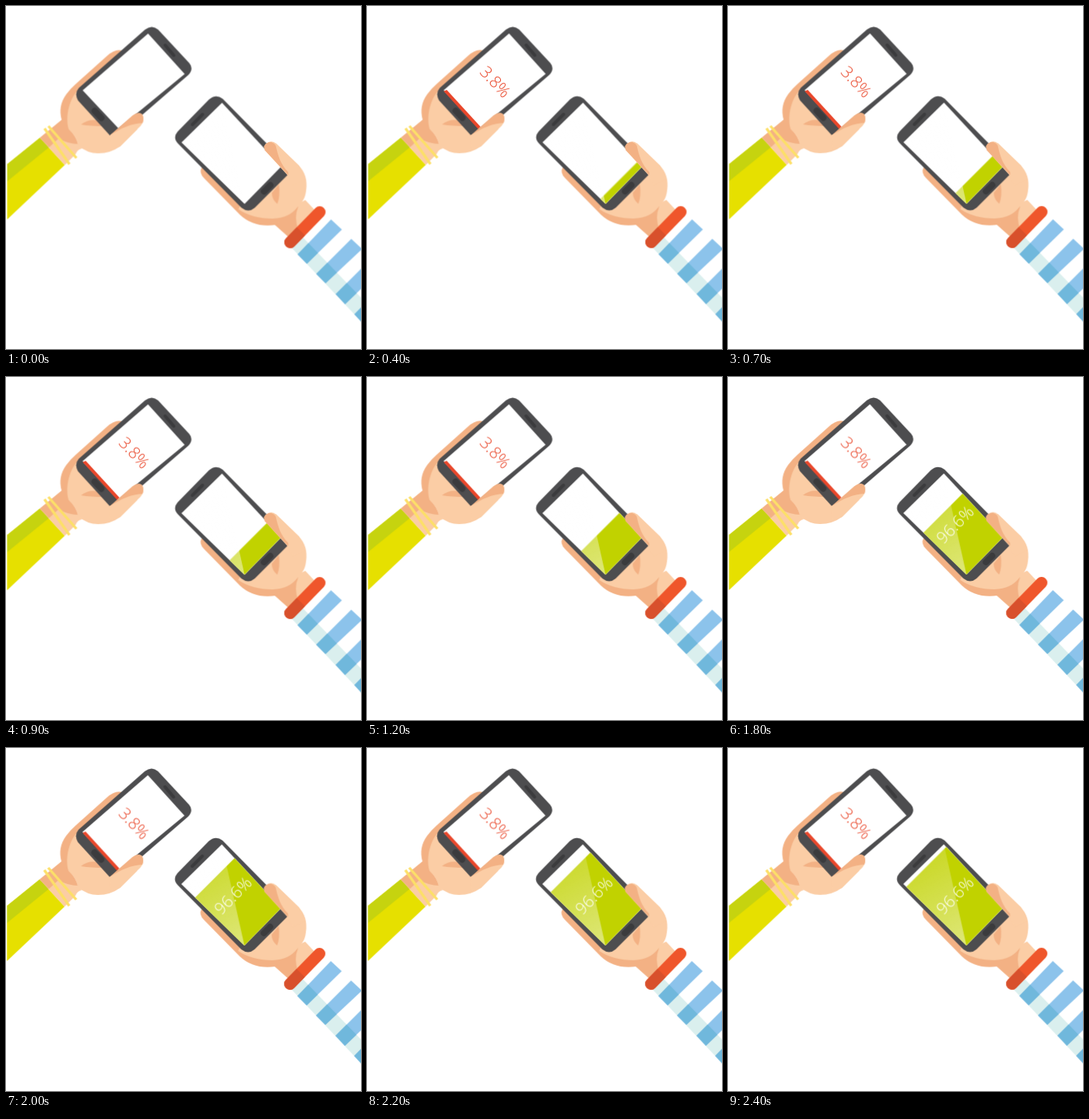
Recreate the animation shown at these times as an HTML page. Size 456 px wide and 441 px high, loop 2500 ms.

```html
<!DOCTYPE html>
<html lang="en">
<head>
<meta charset="utf-8">
<title>Charging phones</title>
<style>
  html, body { margin: 0; width: 100%; height: 100%; overflow: hidden; background: #fff; }
  svg { display: block; width: 456px; height: 441px; }
  text { font: 300 21px "Open Sans", "Noto Sans", sans-serif; text-anchor: middle; }

  .skin { fill: #fbcda5; }
  .shade { fill: #f3b184; }
  .body { fill: #4d4d4f; }
  .screen { fill: #fff; }
  .detail { stroke: #3b3b3d; stroke-linecap: round; }
  .band { stroke: #fde068; stroke-width: 3.4; }
  .low { fill: #e9472b; }

  .scene, .level, .low { animation: 2500ms linear -4ms infinite; }
  .scene { animation-name: drift; }
  .level { animation-name: charge; }
  .low { animation-name: appear; animation-timing-function: step-end; }

  @keyframes drift {
    0% { transform: translate(.5px, .4px); animation-timing-function: steps(24); }
    96%, 100% { transform: translate(.2px, -.2px); }
  }
  @keyframes appear {
    0% { opacity: 0; }
    4%, 100% { opacity: 1; }
  }
  @keyframes charge {
    0% { transform: translate(3px, 3px); animation-timing-function: steps(4); }
    16% { transform: translate(-6.5px, -6.5px); animation-timing-function: steps(5); }
    36% { transform: translate(-19px, -18.8px); animation-timing-function: steps(3); }
    48% { transform: translate(-31px, -30.5px); animation-timing-function: steps(8); }
    80% { transform: translate(-63px, -62px); animation-timing-function: steps(4); }
    96%, 100% { transform: translate(-77px, -75.5px); }
  }
</style>
</head>
<body>
<svg viewBox="0 0 456 441">
  <defs>
    <clipPath id="display"><path d="M225 175L277 124L353 206L306 254Z"/></clipPath>
    <clipPath id="sleeveShade"><path d="M360 304L376 292L456 375V406L447 396Z"/></clipPath>
    <clipPath id="cuffShade"><path d="M350 270H359L400 311V320H350Z"/></clipPath>
    <linearGradient id="gloss" gradientUnits="userSpaceOnUse" x1="300" y1="250" x2="246" y2="148">
      <stop offset="0" stop-color="#fff" stop-opacity=".46"/>
      <stop offset="1" stop-color="#fff" stop-opacity=".16"/>
    </linearGradient>
    <path id="stripes" d="M417 274L431 287L386 331L374 319Z M443 299L457 312L410 356L398 344Z
      M468 325L482 338L435 383L423 370Z M492 350L506 363L459 409L447 396Z"/>
  </defs>

  <g class="scene">
    <!-- left arm -->
    <path fill="#e6e000" d="M1 203L43 169L75 204L1 274Z"/>
    <path fill="#c6d30f" d="M1 203L43 169L55 181L1 225Z"/>
    <path class="skin" d="M43 169L71 146L92 176L97 183Q91 184 89 190L75 204Z"/>
    <path class="shade" d="M43 169L71 146Q66 128 77 113Q82 106 90 99L129 64Q140 54 149 57L150 70L96 130L80 157Q90 167 92 177Q80 177 67 170L55 181Z"/>
    <path class="skin" d="M80 158C75 140 82 117 92 108L110 110L166 150L168 158L146 180Q134 189 118 189Q104 189 92 179Q91 168 80 158Z"/>
    <path class="shade" d="M96 152Q106 144 118 147L126 154Q109 154 96 152Z"/>
    <path class="band" d="M49 157L81 203M54 154L90 195"/>

    <!-- left phone -->
    <path class="body" d="M93 105L178 30Q187 23 195 30L235 73Q241 80 234 88L174 140L133 166L92 121Q87 112 93 105Z"/>
    <path class="screen" d="M98 108L182 35L229 87L144 157Z"/>
    <path class="detail" stroke-width="8" d="M113.5 134.5L122 143.5"/>
    <path class="detail" stroke-width="4" d="M204 50L215 63"/>
    <g class="low">
      <path d="M98 109L102 107.5L145.5 155L142.5 158Z"/>
      <text transform="translate(164.5 97) rotate(47)" y="7.5">3.8%</text>
    </g>
    <path class="skin" d="M133 166L162 140.5Q169 135 174 138.500Q177.500 143 175 150Q173 154 168 158L146 180L134 184Z"/>
    <path class="shade" d="M133 166L162 140.5Q169 135 174 138.500Q177.500 143 175 150C160 151 148 156 133 166Z"/>

    <!-- right arm -->
    <path fill="#daefee" d="M367 311L376 292L456 375V406L447 396Z"/>
    <use href="#stripes" fill="#8cc3eb"/>
    <use href="#stripes" fill="#70b8dc" clip-path="url(#sleeveShade)"/>
    <path class="skin" d="M345 281L374 254L384 249L398 264L364 298Z"/>
    <path class="shade" d="M345 281L375 257Q369 272 375 287L364 298Z"/>
    <path class="shade" d="M251 207Q247 214 254 221L300 268Q318 285 346 281L366 265L300 240L262 205Z"/>
    <path class="skin" d="M298 261L335 177L346 176L375 204Q388 217 385 237Q384 246 380 251L374 258Q364 272 342 273Q316 273 298 261Z"/>
    <path class="shade" d="M350 229Q352 244 348 254Q341 248 341 240Z"/>
    <g fill="none" stroke-width="15" stroke-linecap="round">
      <path stroke="#ef562b" d="M364.5 303.5L402.5 264.5"/>
      <path stroke="#d8502c" d="M364.5 303.5L402.5 264.5" clip-path="url(#cuffShade)"/>
    </g>

    <!-- right phone -->
    <path class="body" d="M220 161L260 120Q269 112 278 119L337 179L362 216L319 259Q311 266 302 259L221 177Q213 169 220 161Z"/>
    <path class="screen" d="M225 175L277 124L353 206L306 254Z"/>
    <path class="detail" stroke-width="8" d="M331 238L339 230"/>
    <path class="detail" stroke-width="4" d="M239 152L252 139"/>
    <g clip-path="url(#display)">
      <path class="level" fill="#c1d200" d="M296 264L366 194L456 284L386 354Z"/>
      <path fill="url(#gloss)" d="M306 254L225 175L277 124Z"/>
      <text fill="#fff" transform="translate(291.2 189.8) rotate(-45.5)" y="7.5">96.6%</text>
    </g>
    <path class="skin" d="M361 217L332 185Q329 178 336 175Q342 172 347 177L376 205L384 222L368 230Z"/>
    <path class="shade" d="M362 217L332 185Q329 178 336 175Q342 173 346 179C349 192 352 203 362 213Z"/>
  </g>
</svg>
</body>
</html>
```
